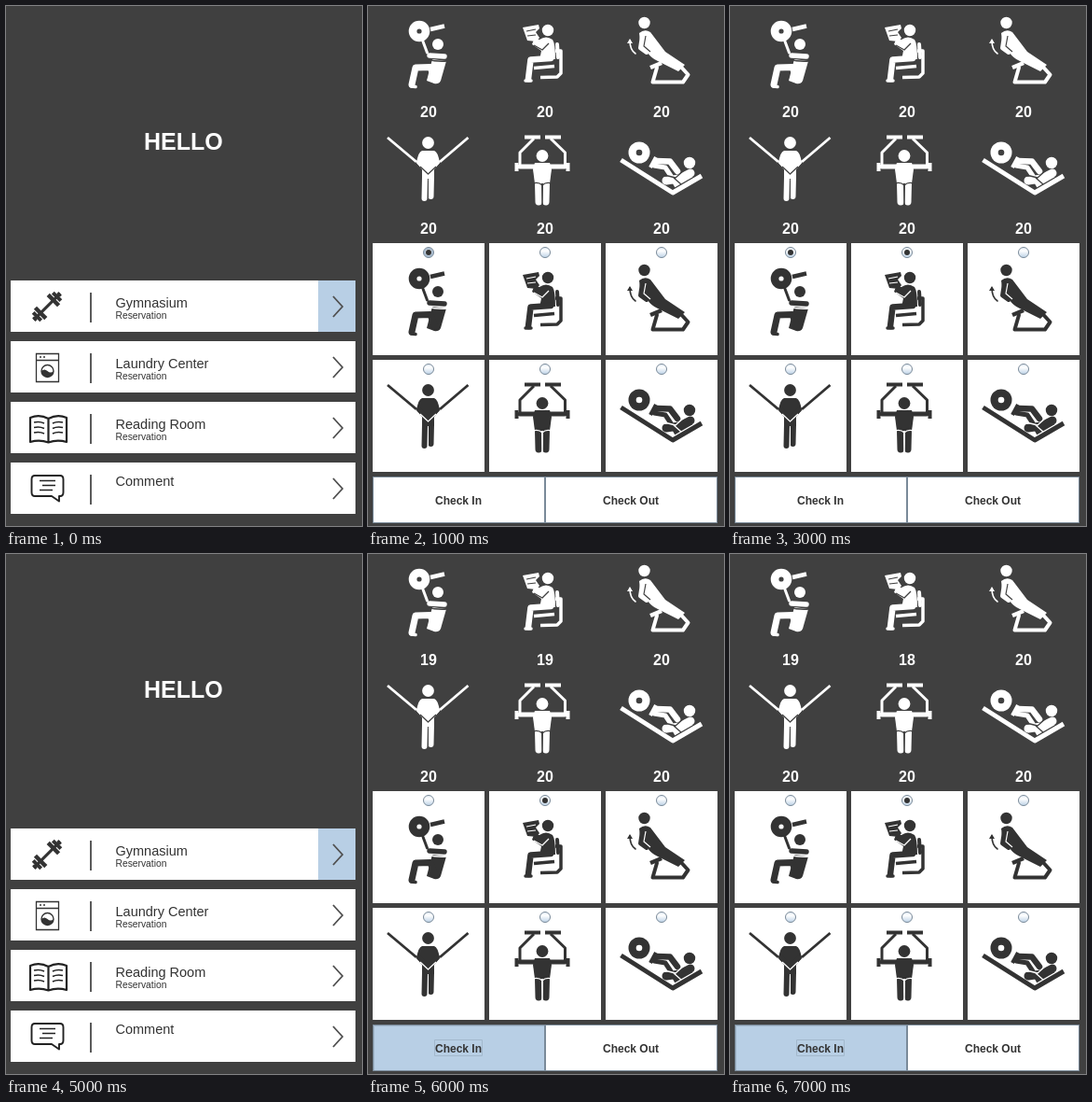
An HTML page with a canvas that plays this animation: 382 by 557 pixels, repeating every 8 s.

```html
<!DOCTYPE html>
<html lang="en">
<head>
<meta charset="utf-8">
<title>Reservation kiosk</title>
<style>
  html, body { margin: 0; width: 100%; height: 100%; overflow: hidden; background: #404040; }
  canvas { display: block; }
</style>
</head>
<body>
<canvas id="stage" width="382" height="557"></canvas>
<script>
const ctx = document.getElementById('stage').getContext('2d');
const LOOP = 8000;
const BACK = '#404040', INK = '#333333', PRESSED = '#b8cfe5', EDGE = '#7a8a99', SHADE = '#a3b8cc';
const SANS = '"Liberation Sans", Arial, sans-serif';

const disc = (x, y, r) => `M${x - r} ${y}a${r} ${r} 0 1 0 ${2 * r} 0a${r} ${r} 0 1 0 ${-2 * r} 0z`;

// Icon parts: [stroke width, path, cap]. Width 0 fills; a leading '-' on the cap cuts out.
const ICONS = [
  [ // overhead lever
    [0, disc(55, 292, 11.3)], [0, disc(55, 292, 2.6), '-'],
    [4.5, 'M67 290L82 286.5', 'butt'],
    [3, 'M59 303L63.5 315'],
    [0, disc(75, 306, 6)],
    [0, 'M69 322L84 324L78 345Q76 349 71 348L63 345z'],
    [7, 'M72 344L67 330.5L51 331L47 349'],
    [3.5, 'M46 351L51 351.5'],
    [1.5, 'M64 322Q73 325 85 324', '-butt'],
    [5.5, 'M66 318L82 319']
  ],
  [ // seated curl
    [0, disc(193, 291, 6.2)],
    [0, 'M166 288L183 285L184 289L180 293L184 299L181 303L171 302z'],
    [1.2, 'M170 292L180 290M171 297L180 296', '-butt'],
    [0, 'M184 301Q191 296 198 301Q201 305 201 322L184 323L186 313L176 306L178 301z'],
    [1.3, 'M178 307L187 312L194 305', '-butt'],
    [6.5, 'M196 321L174.5 322.5L172 343'], [3.5, 'M169 345L175 345'],
    [3.5, 'M178 331.5L200 329.5', 'butt'],
    [4, 'M203 306L204 320'],
    [3.5, 'M201 313L207 313L207 337L203 341L185 341.5', 'butt']
  ],
  [ // back extension
    [0, disc(296.5, 283, 6.2)],
    [0, 'M291 294Q297 289 303 293L319 314L340 328L333 335L311 324Q304 321 300 315L293 311z'],
    [1.2, 'M298 297L296 308L303 314', '-butt'],
    [4, 'M294 297L292 310L299 315'],
    [1.6, 'M281 302Q281 312 287 316'], [0, 'M278 305L281 300L284 305z'],
    [4.5, 'M303 331L315 326', 'butt'],
    [4, 'M310 331L305.5 346.5L338 346.5L343.5 338.5L332 326']
  ],
  [ // cable crossover
    [2.8, 'M21 406L52 432M107.5 406L77 432', 'butt'],
    [0, disc(64.5, 411.5, 6.4)],
    [0, 'M58 420L71 420Q75 421 77 433L71 440L71 450L58 450L58 440L52 433Q54 421 58 420z'],
    [5, 'M54.5 432L64.5 442L74.5 432'],
    [1.2, 'M56 437L64.5 445L73 437', '-butt'],
    [6, 'M61 448L60.5 471M68 448L67.5 469'],
    [1, 'M64.5 452L64.5 474', '-butt']
  ],
  [ // butterfly press
    [4.2, 'M168 405.5L185 405.5M190 405.5L207 405.5', 'butt'],
    [3, 'M178 407L163 422L163 438M196 407L211.5 422L211.5 438', 'butt'],
    [4, 'M159.5 433L159.5 442M214.5 433L214.5 442', 'butt'],
    [0, disc(187, 425.5, 6.4)],
    [5, 'M163 437L211 437'],
    [0, 'M179 433L195 433L197 440L195 455L179 455L177 440z'],
    [7, 'M182.5 455L183 475M191.5 455L191 475'],
    [1.2, 'M177 455Q183 453 187 457Q191 453 197 455M187 457L187 481', '-butt']
  ],
  [ // leg press
    [5, 'M271.5 430L327 465L358 447', 'butt'],
    [0, disc(291, 422, 11.5)], [0, disc(291, 422, 3.3), '-'],
    [4, 'M303 438L309 427', 'butt'],
    [6.5, 'M309 431L324 431.5L332 442'],
    [5, 'M307 436L319 438L325 447'],
    [0, disc(345, 433, 6.2)],
    [9, 'M346 444L334 450L320 452'],
    [5, 'M347 446L328 457', 'butt'],
    [1.3, 'M314 447L322 447L330 449L339 441M328 449L336 456', '-butt']
  ]
].map(parts => parts.map(([width, d, cap = 'round']) => ({
  width, path: new Path2D(d), cut: cap[0] === '-', cap: cap.replace('-', '') || 'round'
})));

function rect(x, y, w, h, color) {
  ctx.fillStyle = color;
  ctx.fillRect(x, y, w, h);
}

function text(str, x, y, font, color, centered) {
  ctx.font = `${font} ${SANS}`;
  ctx.fillStyle = color;
  const left = centered ? Math.round(x - ctx.measureText(str).width / 2) : x;
  ctx.fillText(str, left, y);
}

function stroke(d, width, color = INK, cap = 'butt') {
  ctx.lineWidth = width;
  ctx.strokeStyle = color;
  ctx.lineCap = cap;
  ctx.lineJoin = cap === 'round' ? 'round' : 'miter';
  ctx.stroke(new Path2D(d));
}

function fill(d, color = INK) {
  ctx.fillStyle = color;
  ctx.fill(new Path2D(d));
}

function icon(parts, dy, fg, bg) {
  ctx.save();
  ctx.translate(0, dy);
  ctx.lineJoin = 'round';
  for (const { width, path, cut, cap } of parts) {
    ctx.fillStyle = ctx.strokeStyle = cut ? bg : fg;
    ctx.lineWidth = width;
    ctx.lineCap = cap;
    if (width) ctx.stroke(path); else ctx.fill(path);
  }
  ctx.restore();
}

function dumbbell() {
  ctx.save();
  ctx.translate(44, 322);
  ctx.rotate(-Math.PI / 4);
  rect(-20, -1.5, 40, 3, INK);
  for (const side of [-1, 1]) {
    ctx.save();
    ctx.scale(side, 1);
    rect(7.5, -8, 4.5, 16, INK);
    rect(13, -6, 4, 12, INK);
    rect(17, -2.5, 3, 5, INK);
    ctx.restore();
  }
  ctx.restore();
}

function washer() {
  stroke('M32.5 372.5H56.5V402.5H32.5zM32.5 379.5H56.5', 1.3);
  fill(disc(37, 376, 1) + disc(41, 376, 1));
  stroke(disc(44.5, 391, 6.5), 1.4);
  fill('M38 391Q41 388 44.5 391T51 391A6.5 6.5 0 0 1 38 391z');
}

function book() {
  stroke('M45.5 442Q36 437 26 441V467Q36 464 45.5 467.5Q55 464 65 467V441Q55 437 45.5 442V467', 2.2, '#222', 'round');
  for (const y of [446, 451.5, 457]) {
    stroke(`M30 ${y}Q36 ${y - 1.5} 41 ${y + 1}M50 ${y + 1}Q55 ${y - 1.5} 61 ${y}`, 1.6, '#222');
  }
}

function bubble() {
  stroke('M31 503H58Q61.5 503 61.5 507V521Q61.5 525 58 525H57V530.5L49 525H31Q27.5 525 27.5 521V507Q27.5 503 31 503z', 1.9, '#222', 'round');
  stroke('M36 508.5H53M39 513.5H53M36 518.5H50', 1.5, '#222');
}

const CARDS = [
  ['Gymnasium', dumbbell], ['Laundry Center', washer],
  ['Reading Room', book], ['Comment', bubble]
];

function menu() {
  text('HELLO', 190, 154, 'bold 25px', '#fff', true);
  CARDS.forEach(([title, draw], i) => {
    const y = 294 + 65 * i, last = i === 3;
    rect(5, y, 370, 55, '#fff');
    if (i === 0) rect(335, y, 40, 55, PRESSED);
    draw();
    rect(90, y + 13, 2, 32, '#5a5a5a');
    text(title, 117.5, y + (last ? 25 : 29), '14.5px', INK);
    if (!last) text('Reservation', 117.5, y + 41, '10.3px', INK);
    stroke(`M351 ${y + 17}L361 ${y + 28}L351 ${y + 39}`, 1.8, '#505050');
  });
}

function radio(x, y, on, hover) {
  const shade = ctx.createLinearGradient(0, y - 6, 0, y + 6);
  shade.addColorStop(0, '#dde8f3');
  shade.addColorStop(0.35, '#ffffff');
  shade.addColorStop(1, PRESSED);
  fill(disc(x, y, 5.5), shade);
  if (hover) stroke(disc(x, y, 4.3), 1.8, SHADE);
  stroke(disc(x, y, 5.5), 1, EDGE);
  if (on) fill(disc(x, y, 3));
}

function button(x, label, pressed) {
  rect(x, 504, 185, 50, EDGE);
  rect(x + 1, 505, 183, 48, pressed ? PRESSED : '#fff');
  if (pressed) {
    stroke(`M${x + 1.5} 553V505.5H${x + 184}`, 1, SHADE);
    stroke(`M${x + 66.5} 520.5h51v17h-51z`, 1, SHADE);
  }
  text(label, x + 92.5, 534, 'bold 12px', INK, true);
}

function gym({ counts, selected, hover, pressed }) {
  ICONS.forEach((parts, i) => {
    const col = i % 3, row = Math.floor(i / 3);
    const x = 5 + 125 * col, y = 254 + 125 * row;
    icon(parts, -265, '#fff', BACK);
    text(counts[i] ?? 20, x + 60, 119 + 125 * row, 'bold 16px', '#fff', true);
    rect(x, y, 120, 120, '#fff');
    icon(parts, 0, INK, '#fff');
    radio(x + 60, y + 10, selected.includes(i), hover === i);
  });
  button(5, 'Check In', pressed);
  button(190, 'Check Out', false);
}

const MENU = null;
const STEPS = [
  MENU,
  { counts: [], selected: [0], hover: 0 },
  { counts: [], selected: [0, 1], hover: 1 },
  { counts: [], selected: [0, 1] },
  { counts: [], selected: [0, 1], pressed: true },
  MENU,
  { counts: [19, 19], selected: [1], pressed: true },
  { counts: [19, 18], selected: [1], pressed: true }
];

const start = performance.now();
function frame() {
  const t = (performance.now() - start) % LOOP;
  const step = STEPS[Math.floor(t / 1000)];
  rect(0, 0, 382, 557, BACK);
  if (step === MENU) menu(); else gym(step);
  requestAnimationFrame(frame);
}
frame();
</script>
</body>
</html>
```
